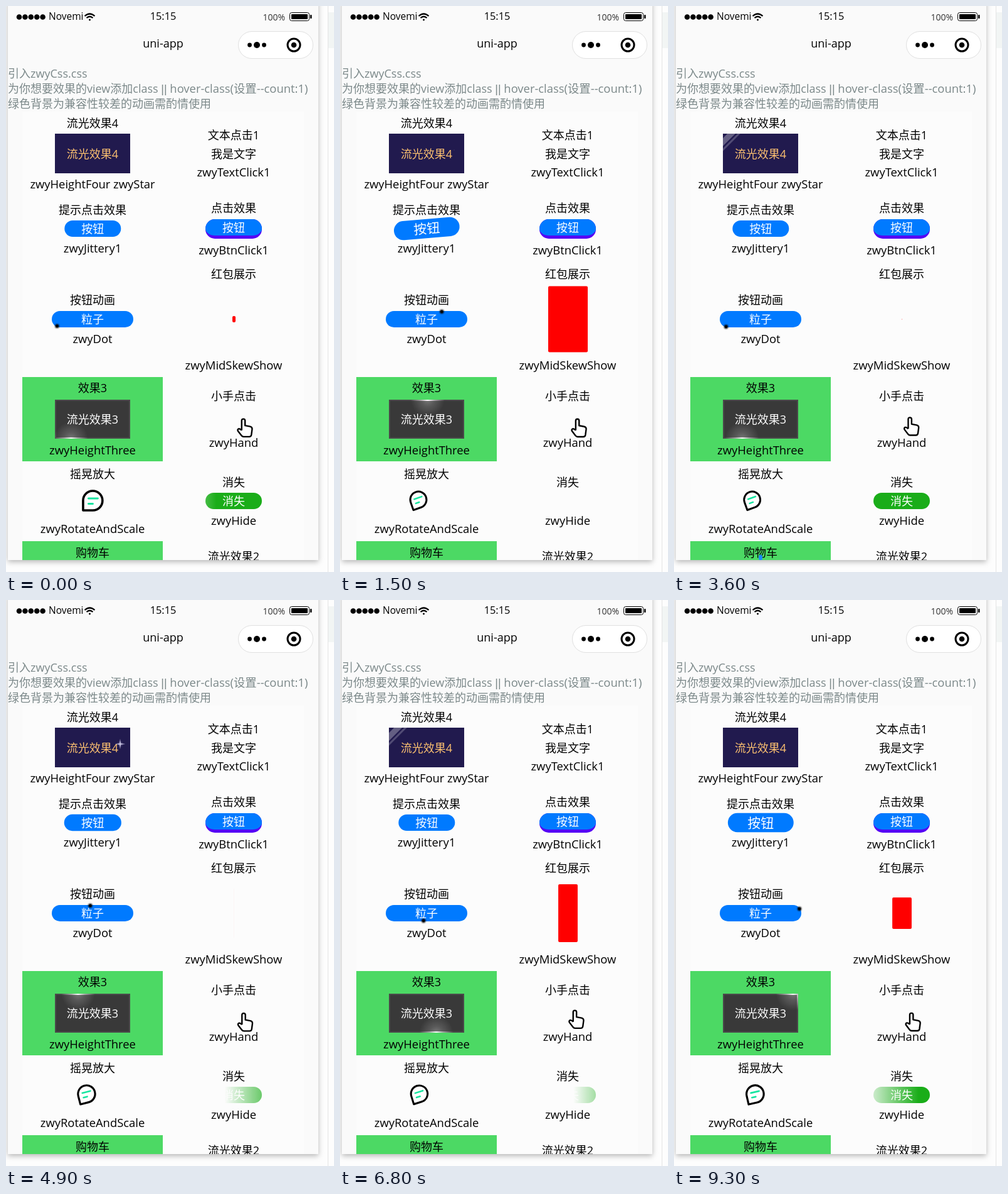
Write an HTML page that moves like this. It is 523 px wide and 900 px high and loops after 9400 ms.

```html
<!DOCTYPE html>
<html lang="zh-CN">
<head>
<meta charset="utf-8">
<style>
html, body { margin: 0; width: 100%; height: 100%; overflow: hidden; background: #fdfdfd; }
svg { display: block; width: 523px; height: 900px; }
text { font: 18px "Open Sans", "Noto Sans CJK SC", "Noto Sans CJK", sans-serif; }
.mid { text-anchor: middle; }
.latin { font-size: 18.4px; }
.pipes { font-family: "Liberation Sans", sans-serif; }
.white { fill: #fff; font-weight: 500; }
.intro { fill: #7b8889; }
</style>
</head>
<body>
<svg viewBox="0 0 523 900">
  <defs>
    <filter id="shadow" x="-5%" y="-5%" width="110%" height="110%">
      <feDropShadow dx="0" dy="3" stdDeviation="4" flood-opacity=".28"/>
    </filter>
    <filter id="soft" x="-1" y="-1" width="3" height="3"><feGaussianBlur stdDeviation="1.1"/></filter>
    <radialGradient id="glowFill">
      <stop offset="0" stop-color="#fff"/>
      <stop offset=".4" stop-color="#fff" stop-opacity=".5"/>
      <stop offset="1" stop-color="#fff" stop-opacity="0"/>
    </radialGradient>
    <linearGradient id="wipe" gradientUnits="userSpaceOnUse" y1="0" y2="0">
      <stop offset="0" stop-color="#000"/><stop offset="1" stop-color="#fff"/>
    </linearGradient>
    <mask id="fade" style="mask-type:luminance" maskUnits="userSpaceOnUse" x="310" y="765" width="110" height="45">
      <rect x="310" y="765" width="110" height="45" fill="url(#wipe)"/>
    </mask>
    <clipPath id="screen"><rect x="3" width="495" height="881"/></clipPath>
    <clipPath id="navyBox"><rect x="78" y="203" width="120" height="63"/></clipPath>
    <clipPath id="grayBox"><rect x="78" y="626" width="120" height="62"/></clipPath>
  </defs>

  <rect x="513" y="10" width="10" height="57" fill="#f2f5f4"/>
  <path d="M513.5 0V900" stroke="#e4e4e4"/>
  <rect x="3" y="-10" width="495" height="891" fill="#fafafa" filter="url(#shadow)"/>

  <g clip-path="url(#screen)">
    <rect x="26" y="168" width="449" height="713" fill="#fcfcfc"/>

    <!-- status and title bars -->
    <path d="M21 17.5H59" stroke="#000" stroke-width="8.6" stroke-linecap="round" stroke-dasharray="0 9.4"/>
    <text x="68" y="22" style="font-size:15.5px">Novemi</text>
    <g fill="none" stroke="#000" stroke-width="2.2">
      <path d="M125.5 16Q133.5 9 141.5 16M128.5 19Q133.5 14.5 138.5 19"/>
      <circle cx="133.5" cy="22" r="1" fill="#000" stroke-width="1"/>
    </g>
    <text class="mid" x="250.5" y="22" style="font-size:16.3px">15:15</text>
    <text x="409.5" y="22.5" style="font-size:14px" fill="#333">100%</text>
    <rect x="452.5" y="10.5" width="31" height="13" rx="3" fill="none" stroke="#000"/>
    <rect x="455" y="13" width="26" height="8" rx="1"/>
    <rect x="485" y="14" width="2.5" height="6" rx="1"/>
    <rect x="370.5" y="40.5" width="119" height="43" rx="21.5" fill="#fff" stroke="#e0e0e0"/>
    <circle cx="388.5" cy="62" r="3.4"/><circle cx="400" cy="62" r="5"/><circle cx="411.5" cy="62" r="3.4"/>
    <circle cx="459" cy="62" r="10" fill="none" stroke="#000" stroke-width="3"/><circle cx="459" cy="62" r="4.3"/>
    <text class="mid" x="250.5" y="66">uni-app</text>

    <text class="intro" x="3" y="114">引入zwyCss.css</text>
    <text class="intro" x="3" y="138">为你想要效果的view添加class <tspan class="pipes">||</tspan> <tspan class="latin">hover-class(设置--count:1)</tspan></text>
    <text class="intro" x="3" y="162">绿色背景为兼容性较差的动画需酌情使用</text>

    <path d="M26 590H250V724H26ZM26 851H250V881H26Z" fill="#4cd964"/>
    <g id="labels"></g>

    <!-- sweep and sparkle -->
    <g clip-path="url(#navyBox)">
      <rect x="78" y="203" width="120" height="63" fill="#211a4e"/>
      <g id="sweep" stroke="#fff">
        <path d="M98 183L-22 303" stroke-width="9" opacity=".3"/>
        <path d="M110 183L-10 303" stroke-width="3" opacity=".22"/>
      </g>
      <text class="mid" x="138" y="241.5" fill="#fcc070" style="font-weight:500">流光效果4</text>
      <g id="star" fill="#e9e4ff">
        <circle r="4" opacity=".35" filter="url(#soft)"/>
        <path d="M0-10L1.2-1.2L10 0L1.2 1.2L0 10L-1.2 1.2L-10 0L-1.2-1.2Z"/>
      </g>
    </g>

    <!-- buttons -->
    <g id="jitter">
      <rect x="-45" y="-13" width="90" height="26" rx="13" fill="#007aff"/>
      <text class="mid white" y="6.5">按钮</text>
    </g>
    <rect x="318" y="339" width="90" height="31" rx="15" fill="#5500f5"/>
    <path d="M318 354a15 15 0 0 1 15-15h60a15 15 0 0 1 15 15a15 11 0 0 1-15 11h-60a15 11 0 0 1-15-11Z" fill="#007aff"/>
    <text class="mid white" x="363" y="358.5">按钮</text>
    <rect x="73" y="485" width="130" height="26" rx="13" fill="#007aff"/>
    <text class="mid white" x="138" y="504.5">粒子</text>
    <g id="dot"><circle r="3.2" filter="url(#soft)"/><circle r="1.9"/></g>

    <rect id="packet" fill="#f00" rx="2"/>

    <!-- travelling glow, dimmed inside the border -->
    <g clip-path="url(#grayBox)">
      <rect x="78" y="626" width="120" height="62" fill="#4a4a4a"/>
      <circle id="glow" r="27" fill="url(#glowFill)"/>
      <rect x="80" y="628" width="116" height="58" fill="#303030" opacity=".65"/>
    </g>
    <text class="mid white" x="138" y="663.5">流光效果3</text>

    <path id="hand" fill="#fff" stroke="#000" stroke-width="2.4" stroke-linejoin="round"
      d="M8 19.5V4.2a2.7 2.7 0 0 1 5.4 0V12l8 1.5q3.6.8 3.3 4.2l-1.2 9q-.5 3-3.3 3H11q-2 0-3.3-1.8L2 20.5q-1-2.6 1.2-3.4 2-.5 4.8 2.4"/>

    <g id="bubble" fill="none" stroke-linecap="round" stroke-linejoin="round">
      <path d="M-15.5 15.5V0A15.5 15.5 0 1 1 0 15.5Z" fill="#fff" stroke="#000" stroke-width="3.6"/>
      <path d="M-7-3.5H8M-7 5H0" stroke="#17e5a0" stroke-width="3"/>
    </g>

    <g mask="url(#fade)">
      <rect x="318" y="774" width="90" height="26" rx="13" fill="#1aad19"/>
      <text class="mid white" x="363" y="793.5">消失</text>
    </g>
    <ellipse id="ball" cx="138" cy="877" rx="3" ry="4.5" fill="#1a8cff"/>
  </g>
</svg>

<script>
const $ = id => document.getElementById(id);
const set = (id, attrs) => {
  for (const key in attrs) $(id).setAttribute(key, attrs[key]);
};
const clamp = v => Math.max(0, Math.min(1, v));
const wrap = (v, n) => ((v % n) + n) % n;

// Interpolates rows of [position, ...values].
function track(rows, x) {
  let i = 1;
  while (i < rows.length - 1 && rows[i][0] < x) i++;
  const a = rows[i - 1], b = rows[i];
  const k = clamp((x - a[0]) / (b[0] - a[0]));
  return a.slice(1).map((v, j) => v + (b[j + 1] - v) * k);
}

const columns = [
  [138, { '流光效果4': 186, 'zwyHeightFour zwyStar': 283, '提示点击效果': 324, zwyJittery1: 385,
    '按钮动画': 467, zwyDot: 529, '效果3': 607, zwyHeightThree: 706,
    '摇晃放大': 744, zwyRotateAndScale: 831, '购物车': 869 }],
  [363, { '文本点击1': 205, '我是文字': 235, zwyTextClick1: 264, '点击效果': 321, zwyBtnClick1: 388,
    '红包展示': 426, zwyMidSkewShow: 571, '小手点击': 620, zwyHand: 694,
    '消失': 757, zwyHide: 818, '流光效果2': 875 }]
];
$('labels').innerHTML = columns.map(([x, rows]) => Object.entries(rows).map(([label, y]) =>
  `<text class="mid ${label.startsWith('zwy') ? 'latin' : ''}" x="${x}" y="${y + 6.5}">${label}</text>`
).join('')).join('');

const LOOP = 9400, STEP = 100, SECOND = 912.5;
const dotPath = [[0, 83, 486], [985, 193, 486], [1210, 200, 491], [1410, 202, 498], [1610, 200, 505], [1825, 193, 510]];
const packetSize = [[0, 0.01, 0.01], [0.056, 0.08, 0.095], [0.248, 0.49, 0.476], [0.426, 0, 0.78],
  [0.508, 0.49, 0.876], [0.606, 0.88, 0.96], [0.69, 1, 1]];

function draw(t) {
  const sec = t / SECOND + 0.056;
  const beat = sec % 1;
  const lap = 4 * SECOND;

  const shine = t % (3.5 * SECOND);
  set('sweep', { transform: `translate(${14 + (shine - 409) * 0.18},0)` });
  const size = clamp(1 - Math.abs(shine - 1757) / 300);
  set('star', { transform: `translate(182,229) scale(${size})`, opacity: size });

  const phase = sec / 4 % 1;
  const grow = clamp((phase - 0.354) / 0.03) * clamp((0.66 - phase) / 0.06);
  const tilt = phase > 0.383 && phase < 0.543 ? 5 * Math.cos((phase - 0.383) / 0.08 * 2 * Math.PI) : 0;
  set('jitter', { transform: `translate(138.3,354) rotate(${tilt}) scale(${1 + 0.165 * grow})` });

  const run = wrap(t - 790, lap);
  let [x, y] = track(dotPath, run % (lap / 2));
  if (run >= lap / 2) [x, y] = [276 - x, 996 - y];
  set('dot', { transform: `translate(${x},${y})` });

  const [w, h] = track(packetSize, beat).map((v, i) => v * [63, 105][i]);
  set('packet', { x: 363.5 - w / 2, y: 498 - h / 2, width: w, height: h });

  const along = wrap(t - 880, lap) / lap * 364;
  const [gx, gy] = track([[0, 78, 626], [120, 198, 626], [182, 198, 688], [302, 78, 688], [364, 78, 626]], along);
  set('glow', { cx: gx, cy: gy });

  const tap = 2.5 + 2.5 * Math.cos((sec / 0.6 + 0.04) * 2 * Math.PI);
  set('hand', { transform: `translate(${363.6 + tap},${651 + tap})` });

  const sway = Math.sin(Math.PI * clamp((sec / 1.2 % 1 - 0.045) / 0.64));
  set('bubble', { transform: `translate(${138.5 - 14 * sway},${786.5 - 1.5 * sway}) rotate(${-20 * sway}) scale(${1 - 0.17 * sway})` });

  const edge = 298 + 285 * (beat - 0.248);
  set('wipe', { x1: edge, x2: edge + 92 });

  set('ball', { opacity: sec % 4 < 0.04 ? 1 : 0 });
}

function tick() {
  draw(Math.floor(performance.now() % LOOP / STEP) * STEP);
  requestAnimationFrame(tick);
}
tick();
</script>
</body>
</html>
```
